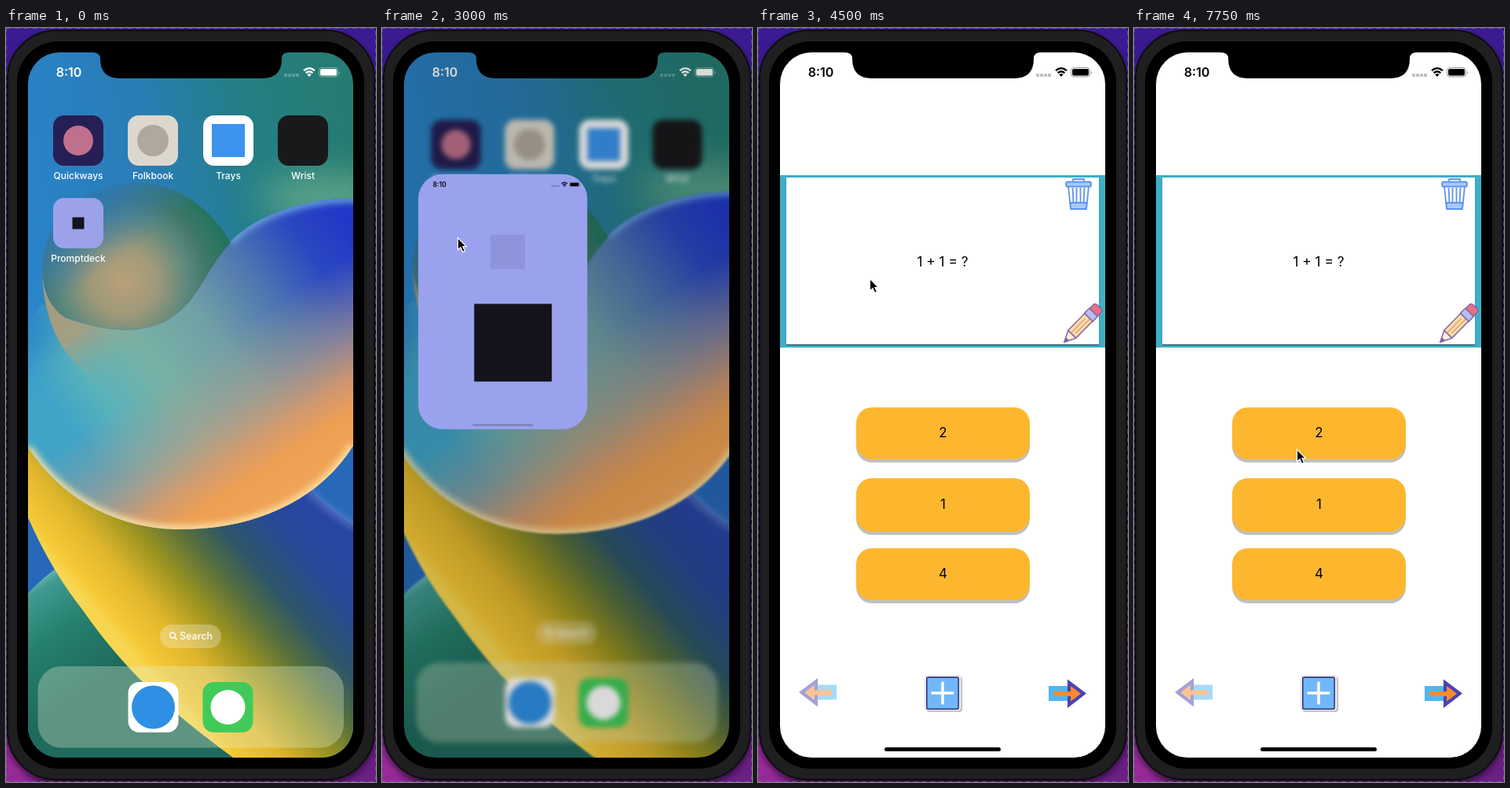
An HTML page that plays this animation: 471x958 px, repeating every 8000 ms.

```html
<!DOCTYPE html>
<html lang="en">
<head>
<meta charset="utf-8">
<style>
html, body { margin: 0; width: 100%; height: 100%; overflow: hidden; background: #2a0c58; }
svg { position: absolute; left: 0; top: 0; overflow: hidden; }
text, .face { font-family: Inter, Roboto, sans-serif; text-anchor: middle; }
#wall, #icons { transform-origin: 235px 479px; }
#screen { position: absolute; left: 28px; top: 31px; width: 414px; height: 896px; overflow: hidden; }
#card { position: absolute; left: 0; top: 156px; width: 414px; height: 219px; background: #3fafc6; }
#paper { position: absolute; left: 8px; top: 3px; width: 398px; height: 212px; background: #fff; box-shadow: 0 1px 1px #174b58; }
.face { position: absolute; inset: 0; display: flex; align-items: center; justify-content: center; color: #000; }
#front { font-size: 17.3px; }
#back { font-size: 66px; }
#shade { position: absolute; inset: 0; background: #000; }
</style>
</head>
<body>
<svg width="471" height="958" viewBox="0 0 471 958">
  <defs>
    <linearGradient id="desk" x2="0" y2="1"><stop stop-color="#3c1a92"/><stop offset=".5" stop-color="#220b50"/><stop offset="1" stop-color="#6d1f86"/></linearGradient>
    <linearGradient id="sky" x1="28" y1="180" x2="420" y2="100" gradientUnits="userSpaceOnUse"><stop stop-color="#2a82c8"/><stop offset=".4" stop-color="#297db4"/><stop offset=".72" stop-color="#247e83"/><stop offset="1" stop-color="#267c72"/></linearGradient>
    <linearGradient id="leaf" x1="70" y1="690" x2="290" y2="500" gradientUnits="userSpaceOnUse"><stop stop-color="#f8d650"/><stop offset=".05" stop-color="#f5c836"/><stop offset=".2" stop-color="#e0b62c"/><stop offset=".36" stop-color="#9c9420"/><stop offset=".52" stop-color="#566f3c"/><stop offset=".66" stop-color="#2d5668"/><stop offset=".84" stop-color="#274a96"/><stop offset="1" stop-color="#2846a4"/></linearGradient>
    <linearGradient id="fern" x1="30" y1="695" x2="120" y2="830" gradientUnits="userSpaceOnUse"><stop stop-color="#8fd0d0"/><stop offset=".14" stop-color="#419a92"/><stop offset=".5" stop-color="#25806c"/><stop offset="1" stop-color="#1f6a5c"/></linearGradient>
    <radialGradient id="curl" cx="150" cy="322" r="138" gradientUnits="userSpaceOnUse"><stop stop-color="#b9a077"/><stop offset=".3" stop-color="#a09a7a"/><stop offset=".6" stop-color="#5a877c"/><stop offset=".78" stop-color="#3f7768"/><stop offset="1" stop-color="#24745f"/></radialGradient>
    <linearGradient id="curlBlue" x1="85" y1="200" x2="150" y2="290" gradientUnits="userSpaceOnUse"><stop stop-color="#2a7ebe"/><stop offset=".3" stop-color="#2f78b4" stop-opacity=".9"/><stop offset="1" stop-color="#3f7ab0" stop-opacity="0"/></linearGradient>
    <linearGradient id="tail" x1="50" y1="330" x2="135" y2="440" gradientUnits="userSpaceOnUse"><stop stop-color="#a59a78"/><stop offset=".5" stop-color="#a2a084"/><stop offset="1" stop-color="#7bafa2" stop-opacity="0"/></linearGradient>
    <linearGradient id="body" x1="410" y1="215" x2="60" y2="480" gradientUnits="userSpaceOnUse"><stop stop-color="#2038c8"/><stop offset=".14" stop-color="#2a48c0"/><stop offset=".32" stop-color="#5078b0"/><stop offset=".5" stop-color="#70a0a6"/><stop offset=".7" stop-color="#78b2a6"/><stop offset=".87" stop-color="#5ab2ba"/><stop offset="1" stop-color="#3fa4c8"/></linearGradient>
    <linearGradient id="glow" x1="264" y1="403" x2="380" y2="580" gradientUnits="userSpaceOnUse"><stop stop-color="#a09a90" stop-opacity="0"/><stop offset=".35" stop-color="#b59a88" stop-opacity=".55"/><stop offset=".62" stop-color="#dd9a68" stop-opacity=".9"/><stop offset=".8" stop-color="#eea052"/><stop offset="1" stop-color="#f0a458"/></linearGradient>
    <path id="ball" d="M-20 440V470Q0 500 28 533C75 605 150 637 222 637C310 637 395 605 442 531L480 470V215L442 217C390 215 320 235 285 272C255 305 248 340 216 364C180 392 130 387 75 368L46 350Z"/>
    <path id="lobe" d="M46 310C46 240 100 197 170 197C220 198 262 230 286 273C255 305 248 340 216 364C180 392 130 387 75 368Q48 350 46 310Z"/>
    <clipPath id="ballClip"><use href="#ball"/></clipPath>
    <clipPath id="screenClip"><rect x="28" y="31" width="414" height="896" rx="40"/></clipPath>
    <filter id="soft" x="-1" y="-1" width="3" height="3"><feGaussianBlur stdDeviation="24"/></filter>
    <filter id="rim" x="-.2" y="-.5" width="1.4" height="2"><feGaussianBlur stdDeviation="4"/></filter>
    <g id="status" fill="currentColor">
      <text x="80" y="61.5" font-size="16" font-weight="600">8:10</text>
      <g opacity=".25"><rect x="354" y="58" width="4" height="4" rx="1"/><rect x="359" y="58" width="4" height="4" rx="1"/><rect x="364" y="58" width="4" height="4" rx="1"/><rect x="369" y="58" width="4" height="4" rx="1"/></g>
      <path d="M379 54.2Q386 48 393 54.2M381.6 57.2Q386 53.4 390.4 57.2" fill="none" stroke="currentColor" stroke-width="2.3"/>
      <path d="M383.4 59.2Q386 57 388.6 59.2L386 62Z"/>
      <rect x="398.5" y="50.5" width="24" height="11.5" rx="3.5" fill="none" stroke="currentColor" opacity=".4"/>
      <rect x="400" y="52" width="21" height="8.5" rx="2"/><path d="M424 54.5v4q1.8-2 0-4" opacity=".5"/>
    </g>
    <g id="arrow">
      <rect x="370" y="836" width="25" height="19" fill="#4fb6f2"/>
      <path d="M394 827.5L418 845.5L394 864Z" fill="#4a43b4"/>
      <path d="M376 843H398V836L411 845.7L398 855.5V849H376Z" fill="#fb8b2c"/>
    </g>
  </defs>

  <rect width="471" height="958" fill="url(#desk)"/>
  <rect x="-30" y="900" width="70" height="80" fill="#a32e9e" filter="url(#soft)"/>
  <rect x="2" y="8" width="467" height="952" rx="62" opacity=".6" filter="url(#rim)"/>
  <rect x=".5" y=".5" width="470" height="957" fill="none" stroke="#8a84b8" stroke-opacity=".5" stroke-dasharray="6 5"/>
  <rect x="2" y="3" width="467" height="952" rx="62" fill="#1f1f20" stroke="#0c0c0e" stroke-width="2"/>
  <rect x="14" y="17" width="442" height="924" rx="52"/>

  <g clip-path="url(#screenClip)">
    <g id="home">
      <g id="wall">
        <rect x="-20" width="520" height="958" fill="url(#sky)"/>
        <ellipse cx="410" cy="215" rx="90" ry="26" fill="#74b592" opacity=".8" filter="url(#soft)"/>
        <rect x="-20" y="500" width="520" height="458" fill="#2768b8"/>
        <path d="M0 752Q35 705 68 684L350 970H0Z" fill="url(#fern)"/>
        <path d="M0 520L28 622Q58 690 98 740C150 815 210 870 296 932L330 970H500V660L442 632Q410 612 385 585Z" fill="url(#leaf)"/>
        <path d="M383 585Q408 613 446 634" fill="none" stroke="#7d92d8" stroke-width="7" opacity=".6" filter="url(#rim)"/>
        <use href="#ball" fill="url(#body)"/>
        <use href="#ball" fill="url(#glow)"/>
        <g clip-path="url(#ballClip)" fill="none" stroke-width="9">
          <path d="M28 533C75 605 150 637 222 637C310 637 395 605 442 531" stroke="#fbe6a8" filter="url(#rim)"/>
          <path d="M450 217C390 215 320 235 285 272" stroke="#6aa6dc" filter="url(#rim)"/>
        </g>
        <ellipse cx="5" cy="370" rx="65" ry="62" fill="#2b86c8" filter="url(#soft)"/>
        <use href="#lobe" fill="url(#curl)"/>
        <use href="#lobe" fill="url(#curlBlue)"/>
        <path d="M46 310C48 380 75 425 130 462L215 420L170 386Q120 385 75 368Q48 350 46 310Z" fill="url(#tail)"/>
      </g>
      <g id="icons"></g>
      <use id="homeStatus" href="#status" color="#fff"/>
    </g>

    <g id="launch">
      <rect id="window" fill="#9aa2ee"/>
      <g id="splash">
        <use href="#status"/>
        <rect id="ghost" x="205" y="179" width="84" height="84" fill="#14131c"/>
        <rect x="165" y="348" width="190" height="190" fill="#14131c"/>
      </g>
      <rect id="bar" height="3" rx="1.5" fill="#7f85bf"/>
    </g>

    <g id="app">
      <rect x="28" y="31" width="414" height="896" fill="#fff"/>
      <use href="#status"/>
      <g id="buttons" font-size="17"></g>
      <use href="#arrow"/>
      <use href="#arrow" transform="translate(470 -1.5) scale(-1 1)" opacity=".5"/>
      <rect x="214" y="824" width="46" height="45" rx="4" fill="#b9b9bd"/>
      <rect x="212.5" y="822.5" width="45.5" height="45" rx="4" fill="#fff" stroke="#ddd"/>
      <rect x="214.8" y="824.8" width="40.5" height="40.5" rx="2" fill="#70b7fb" stroke="#3c3a78" stroke-width="1.7"/>
      <path d="M222 845H248M235 832V858" stroke="#fff" stroke-width="3.6" stroke-linecap="round"/>
      <rect id="homeBar" x="161" y="914" width="148" height="5" rx="2.5"/>
    </g>
  </g>
  <path d="M110 30H360V31Q351 31 351 39Q351 64 326 64H145Q120 64 120 39Q120 31 110 31Z"/>
</svg>

<div id="screen">
  <div id="card">
    <div id="paper"></div>
    <div id="front" class="face">1 + 1 = ?</div>
    <div id="back" class="face">2</div>
    <svg width="414" height="219">
      <g stroke="#5c94f0" stroke-width="1.8" fill="#a9c8fa" stroke-linejoin="round">
        <path d="M373 9V5H387V9" fill="none"/>
        <path d="M367 14H393L390 43H370Z" fill="#fff"/>
        <path d="M369.5 35H390.5L390 43H370Z"/>
        <path d="M372.5 16L373.5 35M377.5 16V35M382.5 16V35M387.5 16L386.5 35"/>
        <rect x="364" y="8.5" width="32" height="6" rx="2"/>
      </g>
      <g transform="translate(362 212) rotate(-45.5)" stroke="#8b6ca6" stroke-width="1.6" stroke-linejoin="round">
        <path d="M0 0L14-7V7Z" fill="#fff0dc"/>
        <path d="M0 0L5-2.5V2.5Z" fill="#5d4a80"/>
        <rect x="14" y="-7" width="30" height="14" fill="#fcdca6"/>
        <path d="M14-2H40M18 2.5H44" stroke="#e2a880"/>
        <rect x="44" y="-7.5" width="9" height="15" fill="#b3bdf0"/>
        <path d="M53-7H59Q63-7 63-3V3Q63 7 59 7H53Z" fill="#ea6f84"/>
      </g>
    </svg>
    <div id="shade"></div>
  </div>
</div>

<svg width="471" height="958">
  <path id="cursor" d="M.5 .5V16L4 12.8L6.7 18.6L9.5 17.3L6.9 11.7H11.3Z" stroke="#fff" stroke-width="1.2"/>
</svg>

<script>
const $ = id => document.getElementById(id);
const LOOP = 8000, TICK = 250, FLIP = 300;
const flips = [4914, 5664, 6164, 6914];
const path = [[500, 212, 203], [1500, 130, 289], [2000, 96, 266], [4000, 96, 266],
  [4750, 165, 344], [7000, 165, 344], [7750, 207, 535], [LOOP, 207, 535]];

const clamp = v => Math.min(1, Math.max(0, v));
const ease = u => (1 - Math.cos(Math.PI * clamp(u))) / 2;
const mix = (a, b, p) => a + (b - a) * p;
const show = (id, on) => $(id).style.display = on ? '' : 'none';
const set = (id, attrs) => { for (const k in attrs) $(id).setAttribute(k, attrs[k]); };

function icon(x, y, tile, mark, size, round, label, id = '') {
  const cx = x + 32, cy = y + 32;
  return `<g id="${id}"><rect x="${x}" y="${y}" width="64" height="64" rx="14" fill="${tile}"/>` +
    `<rect x="${cx - size / 2}" y="${cy - size / 2}" width="${size}" height="${size}" rx="${round ? size / 2 : 0}" fill="${mark}"/></g>` +
    `<text x="${cx}" y="${y + 80.5}" font-size="12" font-weight="500" fill="#fff">${label}</text>`;
}

$('icons').innerHTML =
  icon(60, 111, '#251f55', '#c0708c', 38, true, 'Quickways') +
  icon(155, 111, '#dcd8cd', '#b0a89e', 40, true, 'Folkbook') +
  icon(251, 111, '#fff', '#3b93ec', 42, false, 'Trays') +
  icon(346, 111, '#19191b', '#19191b', 0, true, 'Wrist') +
  icon(60, 216, '#9ca2ea', '#14131c', 15, false, 'Promptdeck', 'deck') +
  `<rect x="196" y="758" width="78" height="30" rx="15" fill="#fff" opacity=".27"/>
   <circle cx="212" cy="771.5" r="3.5" fill="none" stroke="#fff" stroke-width="1.4"/>
   <path d="M214.5 774L218 777.5" stroke="#fff" stroke-width="1.5"/>
   <text x="242" y="777" font-size="12.5" font-weight="500" fill="#fff">Search</text>
   <rect x="40.5" y="811" width="389.5" height="103.5" rx="30" fill="#e4eed0" opacity=".32"/>` +
  icon(155.5, 831, '#fff', '#2f8fe4', 55, true, '') +
  icon(250.5, 831, '#40cb58', '#fff', 44, true, '');

$('buttons').innerHTML = [[482, 66, 2], [572, 68, 1], [661, 66, 4]].map(([y, h, n]) =>
  [[y + 4, '#bfbfc1'], [y, '#fdb72f']].map(([top, fill]) =>
    `<rect x="125" y="${top}" width="221" height="${h}" rx="20" fill="${fill}"/>`).join('') +
  `<text x="235.5" y="${y + h / 2 + 5}">${n}</text>`).join('');

function drawLaunch(t) {
  const p = ease((t - 2790) / 460), k = clamp(p / .43);
  $('wall').style.transform = `scale(${1 + .035 * k})`;
  $('icons').style.transform = `scale(${1 - .015 * k})`;
  $('icons').style.filter = k ? `blur(${3 * k}px)` : '';
  $('wall').style.filter = k ? `blur(${k}px)` : '';
  $('home').style.filter = k ? `brightness(${1 - .15 * k})` : '';
  $('deck').style.filter = t >= 2750 ? 'brightness(.6)' : '';
  show('launch', p > 0 && t < 3500);

  const w = mix(64, 414, p), h = mix(64, 896, p ** 1.385), s = w / 414;
  const x = mix(92, 235, p) - w / 2, y = mix(248, 479, p) - h / 2;
  set('window', { x, y, width: w, height: h, rx: 14 + 26 * Math.sqrt(p) });
  set('splash', { transform: `translate(${x} ${y}) scale(${s}) translate(-28 -31)` });
  set('ghost', { opacity: .16 * (1 - p) });
  set('bar', { x: x + w / 2 - 74 * s, y: y + h - 13 * s, width: 148 * s });
}

function drawCard(t) {
  let turned = false, angle = 0;
  for (const start of flips) {
    const p = ease((t - start) / FLIP);
    if (p >= .5) turned = !turned;
    if (p > 0 && p < 1) angle = p < .5 ? -180 * p : 180 * (1 - p);
  }
  const sin = Math.abs(Math.sin(angle * Math.PI / 180));
  const zoom = 1 + Math.max(0, 3750 - t) / 2000;
  // The nearest edge stays in the plane of the screen while turning.
  $('card').style.transform = angle
    ? `perspective(935px) translateZ(${-207 * sin}px) rotateY(${angle}deg)`
    : `scale(${zoom})`;
  $('shade').style.opacity = sin / 2;
  show('front', !turned);
  show('back', turned);
}

function drawCursor(t) {
  show('cursor', t >= 500);
  if (t < 500) return;
  const i = path.findIndex(k => k[0] > t), [t0, x0, y0] = path[i - 1], [t1, x1, y1] = path[i];
  const u = (t - t0) / (t1 - t0);
  set('cursor', { transform: `translate(${mix(x0, x1, u)} ${mix(y0, y1, u)})` });
}

function frame(now) {
  const t = Math.floor(now % LOOP / TICK) * TICK, inApp = t >= 3500;
  show('home', !inApp);
  show('app', inApp);
  show('screen', inApp);
  $('homeBar').style.fill = t < 3750 ? '#666' : '#000';
  drawLaunch(t);
  drawCard(t);
  drawCursor(t);
  requestAnimationFrame(frame);
}
requestAnimationFrame(frame);
</script>
</body>
</html>
```
